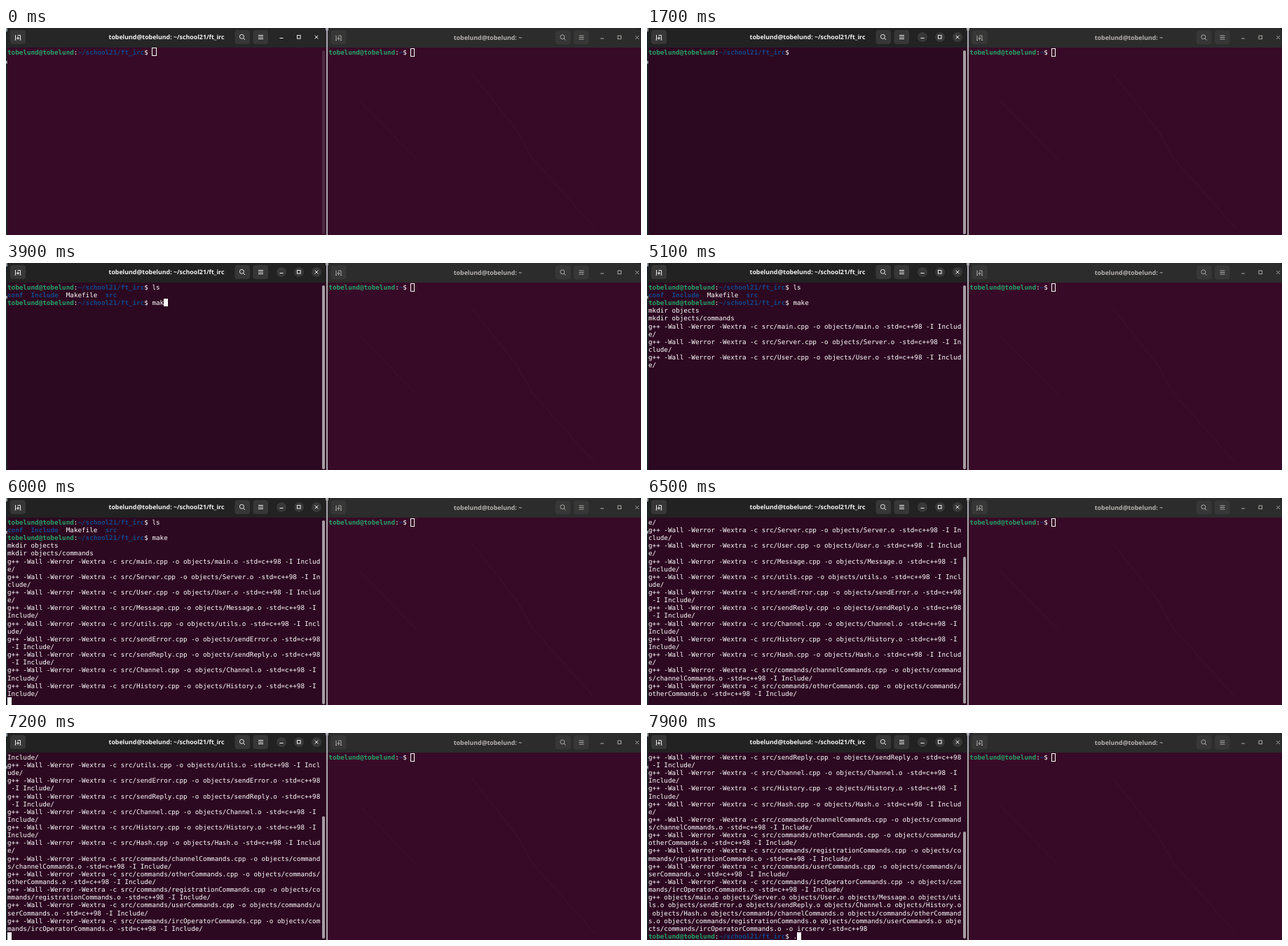
Write an HTML page that moves like this. It is 906 px wide and 296 px high and loops after 8 s.

```html
<!DOCTYPE html>
<html lang="en">
<head>
<meta charset="utf-8">
<title>Building an IRC server</title>
<style>
  html, body { margin: 0; width: 100%; height: 100%; overflow: hidden; background: #1b2426; }
  #stage { position: relative; width: 906px; height: 296px; overflow: hidden; --focus: 0; }
  #stage > * { position: absolute; }
  .gap { left: 456px; top: 0; width: 4px; height: 296px; background: #aaa7ae; }
  .edge { left: 0; width: 1.5px; background: #8d979a; }
  .win { top: 0; height: 296px; overflow: hidden; border-radius: 6px 6px 0 0; background: #370a27; }
  .win::before { content: ""; position: absolute; inset: 0 0 auto; height: 27.5px; background: #2c2c2c; }
  #left { left: 1.5px; width: 455.5px;
    background: color-mix(in srgb, #2d0821 calc(var(--focus) * 100%), #370a27); }
  #left::before { background: color-mix(in srgb, #222 calc(var(--focus) * 100%), #262626); }
  #right { left: 459px; width: 447px; }
  pre { margin: 0; color: #fff; font: 9.27px/11.14px "DejaVu Sans Mono", monospace;
    text-rendering: geometricPrecision; white-space: pre; }
  #log { left: 2px; top: 29.8px; }
  #idle { left: 460.3px; top: 30.4px; }
  .u { color: #26a269; }
  .d { color: #12488b; }
  .cursor { width: 5.6px; height: 11.1px; box-sizing: border-box; background: #fff; }
  .hollow { width: 6.5px; height: 12px; background: none; border: 1px solid #fff; }
  #bar { left: 451px; width: 4px; border-radius: 2px;
    background: color-mix(in srgb, #a59da2 calc(var(--focus) * 100%), #4d2940); }
  svg { left: 0; top: 0; }
  text { font: bold 8.8px "Noto Sans", "Open Sans", sans-serif; text-anchor: middle;
    text-rendering: geometricPrecision; }
  .rings { fill: #383838; opacity: var(--focus); }
</style>
</head>
<body>
<div id="stage">
  <div class="gap"></div>
  <div class="edge" style="top:0;height:5px"></div>
  <div class="edge" style="top:47px;height:4px"></div>
  <div id="left" class="win"></div>
  <div id="right" class="win"></div>
  <svg width="906" height="296" fill="none">
    <defs>
      <g id="controls">
        <g fill="#373737">
          <rect x="6" y="3" width="22" height="20" rx="4"/>
          <rect x="326.5" y="3" width="21.5" height="20" rx="4"/>
          <rect x="352.5" y="3" width="21.5" height="20" rx="4"/>
        </g>
        <g stroke="currentColor">
          <path d="M13.5 10V16.5M12.5 17H14.5M19.5 17H21.5M20.5 16.5V10.5H16.5M17 12V17M14.8 14.5H19.2"/>
          <circle cx="336.4" cy="12.3" r="3"/>
          <path d="M338.6 14.5L341 17M360 10.5H367M360 13H367M360 15.5H367"/>
          <path d="M390.5 14.5H395.5"/>
          <rect x="415.5" y="10.5" width="4.6" height="4.6"/>
          <path d="M440.6 10.6L445.4 15.4M445.4 10.6L440.6 15.4"/>
        </g>
      </g>
    </defs>
    <path d="M665 65L730 148L750 185L840 286M503 103L588 190" stroke="#fff" stroke-opacity=".04"/>
    <g class="rings">
      <circle cx="393" cy="13" r="7"/><circle cx="418" cy="13" r="7"/><circle cx="443" cy="13" r="7"/>
    </g>
    <use href="#controls" color="#eee"/>
    <use href="#controls" x="457.5" y=".5" color="#aaa8a6"/>
    <text id="leftTitle" x="229" y="16.2" fill="#f4f4f4"></text>
    <text id="rightTitle" x="687.5" y="16.6" fill="#b5b3b0"></text>
  </svg>
  <pre id="log"></pre>
  <pre id="idle"></pre>
  <div id="bar"></div>
  <div id="cursor" class="cursor"></div>
  <div class="cursor hollow" style="left:576.8px;top:28.8px"></div>
</div>
<script>
const LOOP = 8000, COLS = 80, ROWS = 24, CHAR_W = 5.581, ROW_H = 11.14, TOP = 28.9;
const BAR_H = 263, BAR_END = 294.5;
const FOCUS = 1000, BLINK = 600;
const host = "tobelund@tobelund", dir = "~/school21/ft_irc";
const promptCols = host.length + dir.length + 3;
const $ = id => document.getElementById(id);

const prompt = path => `<b class="u">${host}</b>:<b class="d">${path}</b>$ `;
const folder = name => `<b class="d">${name}</b>`;
const listing = `${folder("conf")}  ${folder("Include")}  Makefile  ${folder("src")}`;
const wrap = line => line.match(new RegExp(`.{1,${COLS}}`, "g"));

// Typed commands: when the prompt appears, when each key lands, when Enter is hit
const commands = [
  { text: "ls", shown: 0, keys: [1800, 2000], enter: 2300 },
  { text: "make", shown: 2300, keys: [3600, 3700, 3900, 4200], enter: 4500 },
  { text: ".", shown: 7700, keys: [7900], enter: Infinity }
];

const units = [
  ["main", 4500], ["Server", 4700], ["User", 4900], ["Message", 5200], ["utils", 5300],
  ["sendError", 5400], ["sendReply", 5600], ["Channel", 5700], ["History", 5800],
  ["Hash", 6100], ["commands/channelCommands", 6300], ["commands/otherCommands", 6400],
  ["commands/registrationCommands", 6600], ["commands/userCommands", 6800],
  ["commands/ircOperatorCommands", 7100]
];
const compile = name =>
  `g++ -Wall -Werror -Wextra -c src/${name}.cpp -o objects/${name}.o -std=c++98 -I Include/`;
const link = `g++ ${units.map(([name]) => `objects/${name}.o`).join(" ")} -o ircserv -std=c++98`;

const output = [
  [2300, [listing]],
  [4500, ["mkdir objects", "mkdir objects/commands"]],
  ...units.map(([name, at]) => [at, wrap(compile(name))]),
  [7500, wrap(link)]
];
const resets = [FOCUS, ...commands.flatMap(c => [...c.keys, c.enter])];

function screenAt(t) {
  const rows = [];
  let col = 0;
  commands.forEach((c, i) => {
    if (t < c.shown) return;
    const typed = c.text.slice(0, c.keys.filter(k => k <= t).length);
    rows.push(prompt(dir) + typed);
    col = promptCols + typed.length;
    if (t < c.enter) return;
    const until = commands[i + 1].shown;
    for (const [at, lines] of output)
      if (at >= c.enter && at <= until && at <= t) rows.push(...lines);
    if (t < until) {
      rows.push("");
      col = 0;
    }
  });
  return { rows, col };
}

let lastHtml;
function draw(t) {
  const { rows, col } = screenAt(t);
  const visible = rows.slice(-ROWS);
  const html = visible.join("\n");
  if (html !== lastHtml) $("log").innerHTML = lastHtml = html;

  const focus = Math.min(1, Math.max(0, (t - FOCUS + 100) / 200));
  $("stage").style.setProperty("--focus", focus);

  const active = t >= FOCUS;
  const since = t - Math.max(...resets.filter(r => r <= t));
  const lit = !active || Math.floor(since / BLINK) % 2 === 0;
  const cursor = $("cursor");
  cursor.className = active ? "cursor" : "cursor hollow";
  cursor.style.left = 2 + col * CHAR_W + "px";
  cursor.style.top = TOP + (visible.length - 1) * ROW_H - (active ? 0 : .6) + "px";
  cursor.style.visibility = lit ? "visible" : "hidden";

  const height = BAR_H * ROWS / Math.max(ROWS, rows.length);
  $("bar").style.height = height + "px";
  $("bar").style.top = BAR_END - height + "px";
}

$("leftTitle").textContent = `${host}: ${dir}`;
$("rightTitle").textContent = `${host}: ~`;
$("idle").innerHTML = prompt("~");

function tick() {
  draw(performance.now() % LOOP);
  requestAnimationFrame(tick);
}
tick();
</script>
</body>
</html>
```
